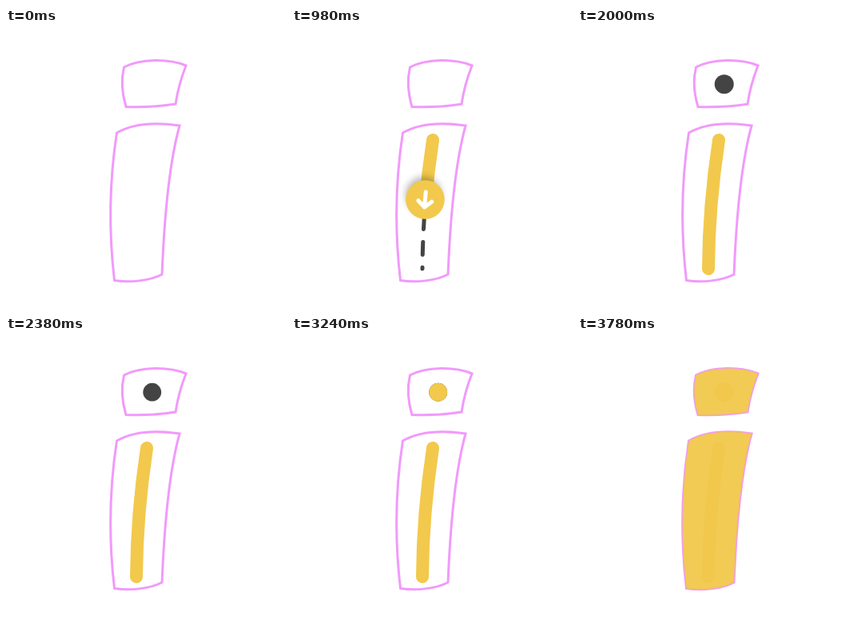
Animation, 350 px wide and 350 px high, one loop 4800 ms. Source, as an HTML page:

```html
<!DOCTYPE html>
<html lang="en">
<head>
<meta charset="utf-8">
<title>Letter tracing</title>
<style>
  html, body { margin: 0; width: 100%; height: 100%; overflow: hidden; background: #fff; }
  svg { display: block; width: 100%; height: 100%; }
</style>
</head>
<body>
<svg viewBox="0 0 350 350" fill="none">
  <defs>
    <path id="letter" d="M147.5 49C168 38 204 38 225 47Q215.5 71 212 95Q184 99.5 150 98.5Q142 72 147.5 49Z
      M138.5 131C160 118.5 190 118 217 122Q200 183 195 308C180 316 155 318.5 135.5 315.5Q124.5 222 138.5 131Z"/>
    <path id="stem" d="M176 140Q163.5 222 163 301"/>
    <filter id="blur" x="-50%" y="-50%" width="200%" height="200%"><feGaussianBlur stdDeviation="5"/></filter>
  </defs>
  <use href="#letter" stroke="#f19afb" stroke-width="3"/>
  <g stroke-linecap="round">
    <use id="guide" href="#stem" stroke="#444" stroke-width="5" stroke-dasharray="16 16"/>
    <use id="ink" href="#stem" stroke="#f2c94c" stroke-width="16"/>
  </g>
  <g id="handle">
    <circle id="shadow" cx="-2" cy="-6" r="22" fill="#000" filter="url(#blur)"/>
    <circle r="24.3" fill="#f2c94c"/>
    <path id="arrow" d="M0-9.5V9.5M-8.5 2L0 9.5L8.5 2" stroke="#fff" stroke-width="5"
      stroke-linecap="round" stroke-linejoin="round"/>
  </g>
  <g id="dot">
    <circle id="dark" r="11.4" fill="#444"/>
    <circle id="gold" r="11.4" fill="#f2c94c"/>
  </g>
  <use id="fill" href="#letter" fill="#f2c94c"/>
</svg>
<script>
  const LOOP = 4800;
  const $ = id => document.getElementById(id);
  const stem = $('stem'), length = stem.getTotalLength();
  const ramp = (t, from, to) => Math.min(1, Math.max(0, (t - from) / (to - from)));
  const fade = (id, value) => $(id).setAttribute('opacity', value);
  // Linear swell and return, 0 to 1 to 0
  const pulse = (t, start) => 1 - Math.abs(2 * ramp(t, start, start + 400) - 1);

  function draw(t) {
    const p = ramp(t, 560, 1180) ** 1.8;
    const at = stem.getPointAtLength(p * length);
    const a = stem.getPointAtLength(Math.max(0, p * length - 1));
    const b = stem.getPointAtLength(Math.min(length, p * length + 1));
    const angle = Math.atan2(a.x - b.x, b.y - a.y) * 180 / Math.PI;

    fade('guide', ramp(t, 460, 560));
    fade('ink', p > 0 ? 1 : 0);
    $('ink').setAttribute('stroke-dasharray', `${p * length} 400`);

    fade('handle', ramp(t, 40, 140) * (1 - ramp(t, 1360, 1440)));
    $('handle').setAttribute('transform', `translate(${at.x - .2} ${at.y - 5.5})`);
    $('arrow').setAttribute('transform', `rotate(${angle})`);
    fade('shadow', .3 * ramp(t, 480, 760));

    const scale = 1 + .48 * (pulse(t, 1980) + pulse(t, 2840));
    $('dot').setAttribute('transform', `translate(182.7 70.2) scale(${scale})`);
    fade('dark', ramp(t, 1740, 1840));
    fade('gold', ramp(t, 2580, 2700));
    fade('fill', .95 * ramp(t, 3540, 3780) ** 1.28);
  }

  const start = performance.now();
  function tick() {
    draw((performance.now() - start) % LOOP);
    requestAnimationFrame(tick);
  }
  tick();
</script>
</body>
</html>
```
